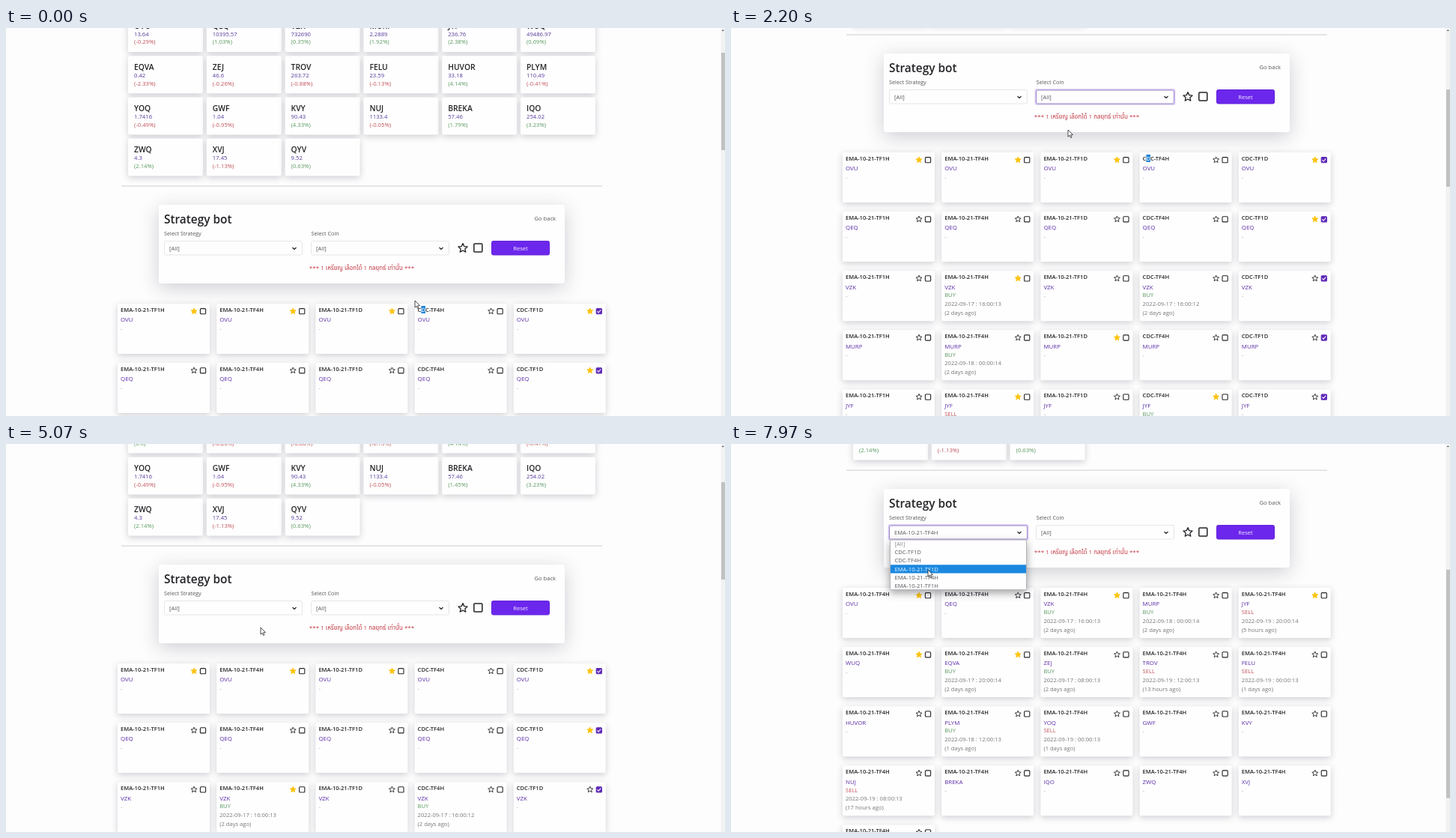
An HTML page with a canvas for the animation above (8 s loop, 960 by 518 pixels).

```html
<!DOCTYPE html>
<html lang="en">
<head>
<meta charset="utf-8">
<title>Strategy bot</title>
<style>
html, body { margin: 0; width: 100%; height: 100%; overflow: hidden; background: #fdfdfd; }
canvas { display: block; width: 100%; height: 100%; }
</style>
</head>
<body>
<canvas id="stage"></canvas>
<script>
const W = 960, H = 518, LOOP = 8000;
const canvas = document.getElementById('stage');
const ctx = canvas.getContext('2d');
const FONT = '"Open Sans", "Noto Sans", "Noto Sans Thai", sans-serif';
const INK = '#242428', GREY = '#58585c', PALE = '#77777c';
const PURPLE = '#5a2ca8', GREEN = '#58985f', RED = '#c05058', GOLD = '#fcc310';
const PAGE = '#fdfdfd', CARD = '#fefefe', SHADE = 'rgba(60,56,80,.24)';

// name, price, change, starred strategies, 4-hour signal
const COINS = [
  ['OVU', '13.64', '-0.29', '11101'],
  ['QEQ', '10395.57', '1.03', '00001'],
  ['VZK', '732690', '0.35', '01000', 'BUY|17 : 16:00:13|2 days'],
  ['MURP', '2.2889', '1.92', '00100', 'BUY|18 : 00:00:14|2 days'],
  ['JYF', '236.76', '2.38', '01010', 'SELL|19 : 20:00:14|5 hours'],
  ['WUQ', '49486.97', '0.69', '01000'],
  ['EQVA', '0.42', '-2.33', '01000', 'BUY|17 : 20:00:14|2 days'],
  ['ZEJ', '46.6', '-0.26', '', 'BUY|17 : 08:00:13|2 days'],
  ['TROV', '263.72', '-0.88', '', 'SELL|19 : 12:00:13|13 hours'],
  ['FELU', '23.59', '-0.13', '', 'SELL|19 : 00:00:13|1 days'],
  ['HUVOR', '33.18', '4.14', ''],
  ['PLYM', '110.49', '-0.41', '', 'BUY|18 : 12:00:13|1 days'],
  ['YOQ', '1.7416', '-0.49', '', 'SELL|19 : 00:00:13|1 days'],
  ['GWF', '1.04', '-0.95', ''],
  ['KVY', '90.43', '4.33', ''],
  ['NUJ', '1133.4', '-0.05', '', 'SELL|19 : 08:00:13|17 hours'],
  ['BREKA', '57.46', '1.79', ''],
  ['IQO', '254.02', '3.23', ''],
  ['ZWQ', '4.3', '2.14', ''],
  ['XVJ', '17.45', '-1.13', ''],
  ['QYV', '9.52', '0.63', '']
].map(([name, price, change, stars, signal]) => ({ name, price, change, stars, signal }));

const BOTS = ['EMA-10-21-TF1H', 'EMA-10-21-TF4H', 'EMA-10-21-TF1D', 'CDC-TF4H', 'CDC-TF1D'];
const BOT_MENU = ['[All]', ...[4, 3, 2, 1, 0].map(i => BOTS[i])];
const COIN_MENU = ['[All]', ...COINS.map(c => c.name)];
const PICKED = 16, ROW = 11.1;

// time, x, y of the pointer tip
const POINTER = [
  [0, 546, 364], [1000, 546, 364], [1500, 450, 94], [1950, 450, 94], [2200, 450, 136],
  [2800, 446, 297], [3050, 446, 297], [3350, 437, 318], [3600, 437, 318], [4000, 430, 93],
  [4250, 430, 93], [5070, 340, 245], [5280, 300, 219], [5350, 300, 219], [5550, 300, 278],
  [5640, 300, 278], [5780, 300, 223], [6950, 300, 223], [7250, 290, 118], [7420, 290, 118],
  [7720, 263, 168], [8000, 263, 168]
];
// start time, from, to: position of the divider line
const SCROLLS = [[0, 211, 110], [533, 110, 9], [3000, 237, 237], [4700, 237, 136], [6550, 136, 35]];
// open, close
const COIN_OPEN = [[2230, 3000], [3512, 4150]];
const BOT_OPEN = [[5340, 5620], [5850, 6350], [7400, 8001]];

const clamp = v => Math.max(0, Math.min(1, v));
const smooth = v => (v = clamp(v), v * v * (3 - 2 * v));

function dividerAt(t) {
  const [start, from, to] = SCROLLS.filter(s => s[0] <= t).pop();
  return from + (to - from) * smooth((t - start) / 250);
}

function pointerAt(t) {
  const i = Math.max(1, POINTER.findIndex(p => p[0] > t));
  const a = POINTER[i - 1], b = POINTER[i];
  const k = smooth((t - a[0]) / (b[0] - a[0]));
  return { x: a[1] + (b[1] - a[1]) * k, y: a[2] + (b[2] - a[2]) * k };
}

function text(str, x, y, size, color, weight = 400, align = 'left') {
  ctx.font = `${weight} ${size}px ${FONT}`;
  ctx.textAlign = align;
  ctx.fillStyle = color;
  ctx.fillText(str, x, y + size * 0.36);
}

function box(x, y, w, h, r, fill, stroke, line = 1) {
  ctx.beginPath();
  ctx.roundRect(x, y, w, h, r);
  if (fill) { ctx.fillStyle = fill; ctx.fill(); }
  if (stroke) { ctx.strokeStyle = stroke; ctx.lineWidth = line; ctx.stroke(); }
}

function raised(x, y, w, h, r, fill, blur, drop, shade = SHADE) {
  ctx.save();
  ctx.shadowColor = shade;
  ctx.shadowBlur = blur * canvas.width / W;
  ctx.shadowOffsetY = drop * canvas.height / H;
  box(x, y, w, h, r, fill);
  ctx.restore();
}

function polyline(points, color, width) {
  ctx.beginPath();
  points.forEach(p => ctx.lineTo(...p));
  ctx.strokeStyle = color;
  ctx.lineWidth = width;
  ctx.stroke();
}

function star(x, y, r, filled) {
  ctx.beginPath();
  for (let i = 0; i < 10; i++) {
    const a = i * Math.PI / 5 - Math.PI / 2, d = i % 2 ? r * 0.46 : r;
    ctx.lineTo(x + Math.cos(a) * d, y + Math.sin(a) * d);
  }
  ctx.closePath();
  ctx.lineJoin = 'round';
  ctx.fillStyle = GOLD;
  ctx.strokeStyle = filled ? GOLD : INK;
  ctx.lineWidth = r > 5 ? 1.3 : 0.9;
  if (filled) ctx.fill();
  ctx.stroke();
}

function check(x, y, size, on) {
  const h = size / 2;
  box(x - h, y - h, size, size, 1, on ? '#5f2ab8' : null, on ? '#5f2ab8' : INK, size > 9 ? 1.5 : 1.1);
  if (on) polyline([[x - 2.3, y], [x - 0.7, y + 1.8], [x + 2.4, y - 1.8]], '#fff', 1.1);
}

function drawTile(coin, i, line, t) {
  const x = 163 + (i % 6) * 104.8, y = line - 214 + Math.floor(i / 6) * 55.2;
  if (y < -60) return;
  const updated = t >= 3300;
  let { price, change } = coin, fill = CARD;
  if (updated && i === 6) {
    price = '0.43';
    change = '0';
    if (t < 3800) fill = '#d0adae';
  }
  if (updated && i === PICKED) change = '1.45';
  raised(x, y - 15, 100, 50, 2, fill, 8, 2.5);
  text(coin.name, x + 8, y, 10.3, INK, 600);
  text(price, x + 8, y + 11, 7.7, '#55389a', 500);
  text(`(${change}%)`, x + 8, y + 21.6, 7.7, change < 0 ? RED : GREEN);
}

function signalFor(coin, bot) {
  if (bot === 1) return coin.signal;
  if (bot === 3 && coin.name === 'VZK') return 'BUY|17 : 16:00:12|2 days';
  if (bot === 3 && coin.name === 'JYF') return 'BUY|18 : 20:00:12|1 days';
}

function drawCard(coin, bot, slot, line, marked) {
  const x = 149 + (slot % 5) * 132.2, y = line + 165 + Math.floor(slot / 5) * 79.1;
  if (y > H + 12 || y < -70) return;
  raised(x, y - 8, 123, 67, 2, CARD, 8, 2.5);
  const tx = x + 4;
  text(BOTS[bot], tx, y, 7.55, INK, 600);
  if (marked) {
    const c = ctx.measureText('C').width, d = ctx.measureText('D').width;
    box(tx + c, y - 5, d, 10, 0, '#2383d4');
    text('D', tx + c, y, 7.55, '#e8f6ff', 600);
  }
  star(x + 102, y + 2.2, 4.2, coin.stars[bot] === '1');
  check(x + 114, y + 2.2, 7.2, bot === 4);
  text(coin.name, tx, y + 13.5, 7.9, PURPLE, 500);
  const signal = signalFor(coin, bot);
  if (!signal) return text('-', tx, y + 25, 7.6, '#a2a2a6');
  const [side, when, ago] = signal.split('|');
  text(side, tx, y + 24.5, 7.6, side === 'BUY' ? GREEN : RED);
  text('2022-09-' + when, tx, y + 36.3, 7.6, PALE);
  text(`(${ago} ago)`, tx, y + 48.3, 7.6, PALE);
}

function drawSelect(x, line, value, focused) {
  const y = line + 73.5;
  if (focused) {
    box(x - 0.5, y - 0.5, 186, 20, 2, null, '#dcd0f2', 2);
    box(x + 0.5, y + 0.5, 184, 18, 2, CARD, '#9c84cc');
  } else {
    box(x + 0.5, y, 184, 18.5, 2, CARD, '#e6e6e8');
  }
  text(value, x + 7, line + 83, 7.6, GREY);
  polyline([[x + 171.5, line + 82], [x + 174, line + 84.5], [x + 176.5, line + 82]], INK, 1.1);
}

function drawPanel(line, coinValue, botValue, focus) {
  ctx.fillStyle = '#cdcdd0';
  ctx.fillRect(154, line - 0.5, 642, 1);
  raised(204, line + 25, 542, 105, 3, CARD, 26, 6);
  text('Strategy bot', 211, line + 44, 15.4, INK, 600);
  text('Go back', 734, line + 43, 7.6, GREY, 400, 'right');
  text('Select Strategy', 211, line + 63, 7.3, GREY);
  text('Select Coin', 407.5, line + 63, 7.3, GREY);
  drawSelect(211, line, botValue, focus === 'bot');
  drawSelect(407, line, coinValue, focus === 'coin');
  star(610, line + 83, 6.4, false);
  check(630.3, line + 82.5, 11, false);
  box(648.5, line + 73.5, 77, 18.5, 2, '#6c27ec', '#6322dc');
  text('Reset', 687, line + 83, 7.6, '#f3edff', 400, 'center');
  text('*** 1 เหรียญ เลือกได้ 1 กลยุทธ์ เท่านั้น ***', 475, line + 109, 8, '#c23a44', 400, 'center');
}

function drawMenu(items, spans, x, top, selected, t, tip) {
  const span = spans.find(s => t >= s[0] && t < s[1]);
  if (!span) return;
  const h = items.length * ROW, fade = smooth((t - span[0] - 20) / 110);
  const inside = tip.y >= top && tip.y < top + h && tip.x > x && tip.x < x + 183;
  const hover = inside ? Math.floor((tip.y - top) / ROW) : selected;
  ctx.save();
  ctx.globalAlpha = fade;
  raised(x, top, 183, h, 0, CARD, 10, 4, 'rgba(50,50,60,.45)');
  items.forEach((item, i) => {
    const y = top + i * ROW;
    if (i === hover) box(x, y, 183, ROW, 0, '#1b88e0');
    text(item, x + 6.5, y + ROW / 2, 7.6, i === hover ? '#e9f5ff' : i ? GREY : '#8c8c90');
  });
  ctx.restore();
  box(x + 0.5, top, 182, h, 1, null, '#b4b4b8');
  if (fade < 1) {
    ctx.fillStyle = `rgba(80,80,90,${0.5 * (1 - fade)})`;
    ctx.fillRect(x, top + h - 1, 183, 2);
  }
}

function drawScrollbar(line, rate, size) {
  box(954.5, 0, 5.5, H, 0, '#f2f2f2');
  box(955, 6 + (322 - line) * rate, 5, size, 0, '#c1c1c1');
  ctx.beginPath();
  [[955.5, 4], [957.3, 2], [959, 4]].forEach(p => ctx.lineTo(...p));
  ctx.fillStyle = '#66666a';
  ctx.fill();
}

function drawPointer({ x, y }) {
  const shape = [[0, 0], [0, 9.2], [2.1, 7.3], [3.6, 10.5], [5, 9.9], [3.6, 6.8], [6.4, 6.6]];
  ctx.beginPath();
  shape.forEach(([dx, dy]) => ctx.lineTo(x + dx, y + dy));
  ctx.closePath();
  ctx.fillStyle = CARD;
  ctx.strokeStyle = INK;
  ctx.lineWidth = 0.8;
  ctx.fill();
  ctx.stroke();
}

function draw(t) {
  const line = dividerAt(t), tip = pointerAt(t);
  const oneCoin = t >= 3000 && t < 4150, oneBot = t >= 5620;
  const focus = t >= 5320 ? 'bot' : t >= 1800 && t < 4300 ? 'coin' : '';

  ctx.fillStyle = PAGE;
  ctx.fillRect(0, 0, W, H);
  COINS.forEach((coin, i) => drawTile(coin, i, line, t));
  drawPanel(line, oneCoin ? COINS[PICKED].name : '[All]', oneBot ? BOTS[1] : '[All]', focus);

  if (oneBot) {
    COINS.forEach((coin, i) => drawCard(coin, 1, i, line));
  } else {
    const list = oneCoin ? [COINS[PICKED]] : COINS;
    list.forEach((coin, r) => BOTS.forEach((_, b) =>
      drawCard(coin, b, r * 5 + b, line, t < 3000 && r === 0 && b === 3)));
  }
  if (oneCoin) text('.', 149, line + 233, 7.6, PALE);

  // The coin list flips above its field when there is no room below.
  const shown = COIN_MENU.slice(0, 20);
  const coinTop = oneCoin ? line + 72 - shown.length * ROW : line + 93;
  drawMenu(shown, COIN_OPEN, 408, coinTop, oneCoin ? PICKED + 1 : 0, t, tip);
  drawMenu(BOT_MENU, BOT_OPEN, 212, line + 93, oneBot ? 4 : 0, t, tip);

  if (oneCoin) drawScrollbar(line, 0.85, 440);
  else if (oneBot) drawScrollbar(line, 0.564, 305);
  else drawScrollbar(line, 0.2426, 130);
  drawPointer(tip);
}

function resize() {
  const dpr = window.devicePixelRatio || 1;
  canvas.width = Math.round(innerWidth * dpr);
  canvas.height = Math.round(innerHeight * dpr);
  ctx.setTransform(canvas.width / W, 0, 0, canvas.height / H, 0, 0);
}

const began = performance.now();
function tick() {
  draw((performance.now() - began) % LOOP);
  requestAnimationFrame(tick);
}
addEventListener('resize', resize);
resize();
tick();
</script>
</body>
</html>
```
